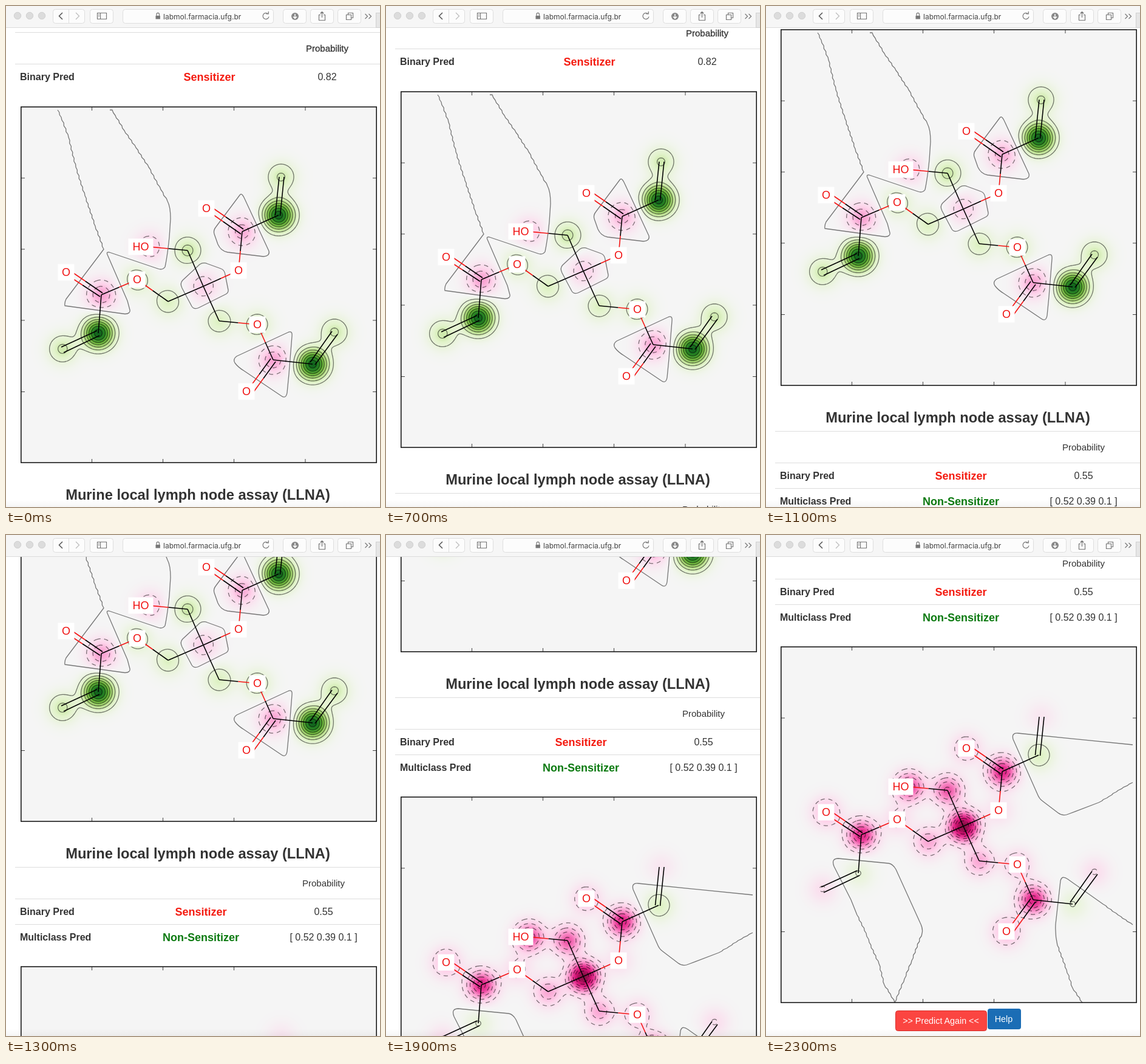
These frames come from a looping animation (616 by 824 pixels, 2400 ms). An HTML page with a canvas:

```html
<!DOCTYPE html>
<html lang="en">
<head>
<meta charset="utf-8">
<title>Skin sensitization prediction</title>
<style>
  html, body { margin: 0; width: 100%; height: 100%; overflow: hidden; background: #fff; }
  #stage { position: relative; width: 616px; height: 824px; overflow: hidden; background: #fff; }
  #page { position: absolute; left: 0; top: 0; width: 616px; height: 1640px; }
  #page > *, #bar, #shade { position: absolute; left: 0; top: 0; }
  #page canvas { left: 25px; }
  #shade { top: 812px; width: 616px; height: 12px; background: linear-gradient(transparent, rgba(0, 0, 0, .04)); }
  svg { display: block; font-family: "Liberation Sans", Arial, sans-serif; }
  text { fill: #333; font-size: 16px; }
  .mid { text-anchor: middle; }
  .bold { font-weight: bold; }
  .title { font-size: 23.7px; }
  .head { font-size: 15px; }
  .class { font-size: 18px; }
  .red { fill: #f41b10; }
  .green { fill: #0b7a10; }
  .button { font-size: 14.3px; fill: #fff; }
  .atom { font-size: 18px; fill: #f01010; }
  .rule { stroke: #ddd; }
  .iso { fill: none; stroke: rgba(0, 0, 0, .52); stroke-width: 1.3; stroke-linejoin: round; }
  .neg { stroke-dasharray: 7 6; }
  .bond { stroke: #000; stroke-width: 1.6; }
  .bond.oxy { stroke: #f51414; }
  .frame { fill: none; stroke: #1a1a1a; stroke-width: 1.6; }
  .tick { fill: none; stroke: #444; }
  .key { fill: #fcfcfc; stroke: #dedede; }
  .icon { fill: none; stroke: #777; stroke-width: 1.2; }
  .url { font: 12.05px Inter, "Open Sans", sans-serif; fill: #444; }
</style>
</head>
<body>
<div id="stage">
  <div id="page">
    <canvas width="585" height="585" style="top:166px"></canvas>
    <canvas width="585" height="585" style="top:990px"></canvas>
    <svg width="616" height="1640">
      <path class="rule" d="M15 43.5H616M15 95.5H616M15 826.5H616M15 878.5H616M15 920.5H616"/>
      <text class="mid head" x="529" y="75" stroke="#333" stroke-width=".3">Probability</text>
      <text class="bold" x="23" y="122">Binary Pred</text>
      <text class="mid bold class red" x="335" y="123">Sensitizer</text>
      <text class="mid" x="529" y="122">0.82</text>
      <g id="plotA"></g>
      <text class="mid bold title" x="316" y="812">Murine local lymph node assay (LLNA)</text>
      <text class="mid head" x="523" y="858">Probability</text>
      <text class="bold" x="23" y="905">Binary Pred</text>
      <text class="mid bold class red" x="321" y="906">Sensitizer</text>
      <text class="mid" x="523" y="905">0.55</text>
      <text class="bold" x="23" y="947">Multiclass Pred</text>
      <text class="mid bold class green" x="321" y="948">Non-Sensitizer</text>
      <text class="mid" x="523" y="947">[ 0.52 0.39 0.1 ]</text>
      <g id="plotB" transform="translate(0 824)"></g>
      <rect x="213.5" y="1588.5" width="150" height="33" rx="4" fill="#fb4541" stroke="#d9302c"/>
      <text class="mid button" x="288" y="1610">&gt;&gt; Predict Again &lt;&lt;</text>
      <rect x="365" y="1585" width="55" height="34" rx="4" fill="#1b6db5"/>
      <text class="mid button" x="391.5" y="1607">Help</text>
    </svg>
  </div>
  <div id="shade"></div>
  <svg id="bar" width="616" height="36">
    <rect width="616" height="36" fill="#f6f6f6"/>
    <path stroke="#dcdcdc" d="M0 35.5H616"/>
    <g fill="#dcdcdc" stroke="#d0d0d0">
      <circle cx="19" cy="16" r="5.7"/><circle cx="39" cy="16" r="5.7"/><circle cx="59" cy="16" r="5.7"/>
    </g>
    <g class="key">
      <rect x="77.5" y="5.5" width="52" height="23" rx="4"/><path d="M103.5 5.5V28.5"/>
      <rect x="138.5" y="5.5" width="38" height="23" rx="4"/>
      <rect x="192.5" y="5.5" width="248" height="23" rx="4"/>
      <rect x="456.5" y="5.5" width="38" height="23" rx="4"/>
      <rect x="501.5" y="5.5" width="38" height="23" rx="4"/>
      <rect x="546.5" y="5.5" width="38" height="23" rx="4"/>
    </g>
    <rect x="609.5" y="11.5" width="10" height="24" fill="#e6e6e6" stroke="#d0d0d0"/>
    <g class="icon">
      <path stroke="#555" stroke-width="1.5" d="M93 11L87.5 16.5L93 22"/>
      <path stroke="#bbb" d="M115 11L120.500 16.500L115 22"/>
      <path d="M150.500 11.500H165.500V21.500H150.500ZM155.500 11.500V21.500M152 14H154M152 16.500H154"/>
      <path d="M248 16V13.500a2.200 2.200 0 0 1 4.400 0V16"/>
      <rect x="246.500" y="16" width="7.400" height="5.500" fill="#777" stroke="none"/>
      <path d="M433 17.500a5 5 0 1 1-2-5M428.500 12.800H432.300V9"/>
      <circle cx="476" cy="17" r="6" fill="#888" stroke="none"/>
      <path stroke="#fff" stroke-width="1.500" d="M476 13V20M473 17.500L476 20.500L479 17.500"/>
      <path d="M518 14.500H515.500V23.500H525.500V14.500H523M520.500 19V9.500M517.500 12.500L520.500 9.500L523.500 12.500"/>
      <path d="M563.500 14V11.500H571.500V19.500H569M560.500 14.500H568.500V22.500H560.500Z"/>
      <path d="M591.500 13L595.500 17L591.500 21M597.500 13L601.500 17L597.500 21"/>
    </g>
    <text class="url" x="259" y="21.500">labmol.farmacia.ufg.br</text>
  </svg>
</div>
<script>
const SIZE = 585, LEFT = 25, TOP = 166, SIGMA = 17, PEAK = 7.8;

// x, y, weight in the first map, weight in the second (in contour steps)
const atoms = [
  [330, 333, 0, -1.9], [389, 371, -2.5, -5.4], [449, 344, 7.5, 1.75], [453, 281, 2.14, -.7],
  [383, 435, 0, -1], [325, 461, -1.6, -8], [299, 402, 2.3, -4.2], [236, 396, -1.7, -4.6],
  [267, 486, 1.75, -2.6], [216, 450, 1.65, -1.3], [157, 475, -2.8, -5.4], [99, 438, 0, -2.3],
  [152, 538, 7.5, 1.04], [93, 564, 2.2, -1.04], [351, 518, 1.75, -2.6], [414, 524, 1.65, -1.9],
  [440, 582, -2.7, -5.4], [396, 634, 0, -2.4], [505, 589, 7.5, 1.04], [541, 536, 2.15, -1.04]
];

// carbon-carbon bonds
const plain = [
  [389, 371, 449, 344], [443.5, 344, 450, 281], [451.5, 345, 458, 281], [325, 461, 299, 402],
  [325, 461, 267, 486], [325, 461, 351, 518], [157, 475, 152, 538], [150, 534, 91, 561],
  [154, 542, 95, 570], [440, 582, 505, 589], [501, 586, 537, 535], [509, 590, 546, 540]
];
// carbon-oxygen bonds, red in the second half
const oxygen = [
  [391, 367, 333, 327], [387, 375, 328, 334], [389, 371, 383, 435], [325, 461, 383, 435],
  [299, 402, 236, 396], [267, 486, 216, 450], [157, 475, 216, 450], [159, 472, 102, 433],
  [155, 478, 97, 440], [351, 518, 414, 524], [440, 582, 414, 524], [436, 580, 398, 632],
  [444, 585, 404, 640]
];
const labels = [
  [330, 333], [383, 435], [216, 450], [99, 438], [414, 524], [396, 634], [222, 396, "HO"]
];

const greens = ["f5f5f5", "e2f3cb", "b2dc80", "6cb63a", "2d8a25", "08591a"];
const pinks = ["f5f5f5", "fdd3ea", "fa92ca", "ea3a98", "d01072", "8c0f48"];
const rgb = hex => [0, 2, 4].map(i => parseInt(hex.substr(i, 2), 16));
const scales = [greens.map(rgb), pinks.map(rgb)];

// Jagged polyline through the given points
function rough(points) {
  const out = [points[0]];
  let side = .8;
  for (let i = 1; i < points.length; i++) {
    const [ax, ay] = points[i - 1], [bx, by] = points[i];
    const n = Math.max(1, Math.round(Math.hypot(bx - ax, by - ay) / 5));
    for (let k = 1; k <= n; k++) {
      out.push([ax + (bx - ax) * k / n + (k < n ? side : 0), ay + (by - ay) * k / n]);
      side = -side;
    }
  }
  return out.map(p => p.map(v => v.toFixed(1)).join(" ")).join("L");
}

const zeroA = [
  "M" + rough([[85, 171], [91, 183], [103, 216], [115, 265], [130, 312], [147, 362], [161, 400]]) +
    "L152 412L99 482Q96 488 97 493L196 506.5Q205 506 204 500L200 485L167 409Q165 404 170 405" +
    "L250 432Q258 435 262 429Q266 410 269 380L271 350Q271 330 266 321L" +
    rough([[266, 321], [255, 302], [235, 265], [214, 233], [195, 205], [180, 180], [175, 171], [171, 171]]),
  "M385 311L346 363Q341 369 343 375L349 392Q354 403 365 405L424 412Q435 411 433 403L393 317Q388 306 385 311Z",
  "M319 425Q325 421 332 424L354 432Q360 434 361 442L366 467Q367 472 360 475L318 496Q310 500 306 494L290 464Q286 456 291 451Z",
  "M464 537L436 550L380 576Q373 581 377 587Q382 594 392 600L453 641Q461 647 463 636L466 605L471 543Q472 533 464 537Z"
];
const zeroB = [
  "M604 327L415 308Q404 307 407 318L447 408Q450 416 456 420L481 439Q489 445 498 441L548 422L" +
    rough([[548, 422], [565, 412], [580, 402], [604, 389]]),
  "M" + rough([[212, 751], [205, 737], [195, 722], [186, 687], [170, 652], [165, 637], [150, 607]]) +
    "L140 582L112 527Q107 514 119 514L202 522Q209 523 214 532L254 620Q259 630 257 637L" +
    rough([[257, 637], [240, 682], [228, 712], [212, 751]]),
  "M" + rough([[604, 623], [580, 607], [555, 589]]) + "L497 548Q487 541 485 551L477 622Q476 640 480 657L" +
    rough([[480, 657], [495, 697], [505, 727], [521, 751]])
];

function makeField(column) {
  const field = new Float32Array(SIZE * SIZE);
  const bell = c => Float32Array.from({ length: SIZE }, (_, i) => Math.exp(-((i - c) ** 2) / (2 * SIGMA ** 2)));
  for (const a of atoms) {
    if (!a[column]) continue;
    const bx = bell(a[0] - LEFT), by = bell(a[1] - TOP);
    for (let y = 0; y < SIZE; y++) {
      const k = by[y] * a[column];
      for (let x = 0; x < SIZE; x++) field[y * SIZE + x] += k * bx[x];
    }
  }
  return field;
}

function paint(canvas, field) {
  const ctx = canvas.getContext("2d"), img = ctx.createImageData(SIZE, SIZE);
  field.forEach((v, i) => {
    const scale = scales[v < 0 ? 1 : 0], t = Math.min(Math.abs(v) / PEAK, .9999) * 5;
    const s = Math.floor(t), f = t - s;
    for (let c = 0; c < 3; c++) img.data[i * 4 + c] = scale[s][c] * (1 - f) + scale[s + 1][c] * f;
    img.data[i * 4 + 3] = 255;
  });
  ctx.putImageData(img, 0, 0);
}

// Marching squares; directed edge links are chained into closed loops
function contour(field, sign, level) {
  const step = 2, next = new Map(), spots = new Map();
  const at = (x, y) => field[y * SIZE + x] * sign - level;
  for (let y = 0; y + step < SIZE; y += step) for (let x = 0; x + step < SIZE; x += step) {
    const c = [[x, y], [x + step, y], [x + step, y + step], [x, y + step]];
    const v = c.map(p => at(...p));
    if (v.every(n => n < 0) || v.every(n => n >= 0)) continue;
    const hits = [];
    for (let k = 0; k < 4; k++) {
      const m = (k + 1) % 4;
      if ((v[k] >= 0) === (v[m] >= 0)) continue;
      const [p, q] = [c[k], c[m]], f = v[k] / (v[k] - v[m]);
      const key = 2 * (Math.min(p[1], q[1]) * SIZE + Math.min(p[0], q[0])) + (p[0] === q[0] ? 1 : 0);
      spots.set(key, [LEFT + p[0] + (q[0] - p[0]) * f, TOP + p[1] + (q[1] - p[1]) * f]);
      hits.push({ key, leaves: v[k] >= 0 });
    }
    hits.forEach((h, i) => { if (h.leaves) next.set(h.key, hits[(i + 1) % hits.length].key); });
  }
  let d = "";
  while (next.size) {
    let key = next.keys().next().value;
    const loop = [];
    while (next.has(key)) {
      loop.push(spots.get(key).map(n => n.toFixed(1)).join(" "));
      const to = next.get(key);
      next.delete(key);
      key = to;
    }
    d += "M" + loop.join("L") + "Z";
  }
  return d;
}

const path = (cls, d) => `<path class="${cls}" d="${d}"/>`;

function ticks(cls, xs, ys) {
  const v = xs.map(x => `M${x} 166v6M${x} 751v-6`), h = ys.map(y => `M25 ${y}h6M610 ${y}h-6`);
  return path("tick " + cls, v.concat(h).join(""));
}

function drawMolecule() {
  let s = "";
  for (const [a, b, c, d] of plain) s += path("bond", `M${a} ${b}L${c} ${d}`);
  for (const [a, b, c, d] of oxygen) {
    const mid = `${(a + c) / 2} ${(b + d) / 2}`;
    s += path("bond", `M${a} ${b}L${mid}`) + path("bond oxy", `M${mid}L${c} ${d}`);
  }
  for (const [x, y, name = "O"] of labels) {
    const w = name.length > 1 ? 41 : 27;
    s += `<rect x="${x - w / 2}" y="${y - 13.5}" width="${w}" height="27" fill="#fff"/>` +
      `<text class="mid atom" x="${x}" y="${y + 6.3}">${name}</text>`;
  }
  return s;
}

function drawPlot(id, canvas, column, zero, extra) {
  const field = makeField(column);
  paint(canvas, field);
  let s = zero.map(d => path("iso", d)).join("");
  for (let level = 1; level < 8; level++) {
    s += path("iso", contour(field, 1, level)) + path("iso neg", contour(field, -1, level));
  }
  s += drawMolecule() + ticks("", [141.5, 258.5, 375.5], [283, 634.5]) + extra +
    '<rect class="frame" x="24.8" y="166" width="585.4" height="585"/>';
  document.getElementById(id).innerHTML = s;
}

const [heatA, heatB] = document.querySelectorAll("canvas");
drawPlot("plotA", heatA, 2, zeroA, ticks("fine", [493], [400, 517]));
drawPlot("plotB", heatB, 3, zeroB, "");

// Scroll position for every 100 ms
const scroll = [
  0, 0, 0, 1, 1, 1, 2, 25, 40, 62, 92, 127,
  205, 280, 325, 355, 375, 389, 460, 559, 650, 720, 770, 806
];
const page = document.getElementById("page"), fine = document.querySelector(".fine");
let start;
function tick(now) {
  start ??= now;
  const y = scroll[Math.floor((now - start) / 100 + .001) % scroll.length];
  page.style.transform = `translateY(${-y}px)`;
  fine.style.visibility = y > 200 ? "hidden" : "visible";
  requestAnimationFrame(tick);
}
requestAnimationFrame(tick);
</script>
</body>
</html>
```
